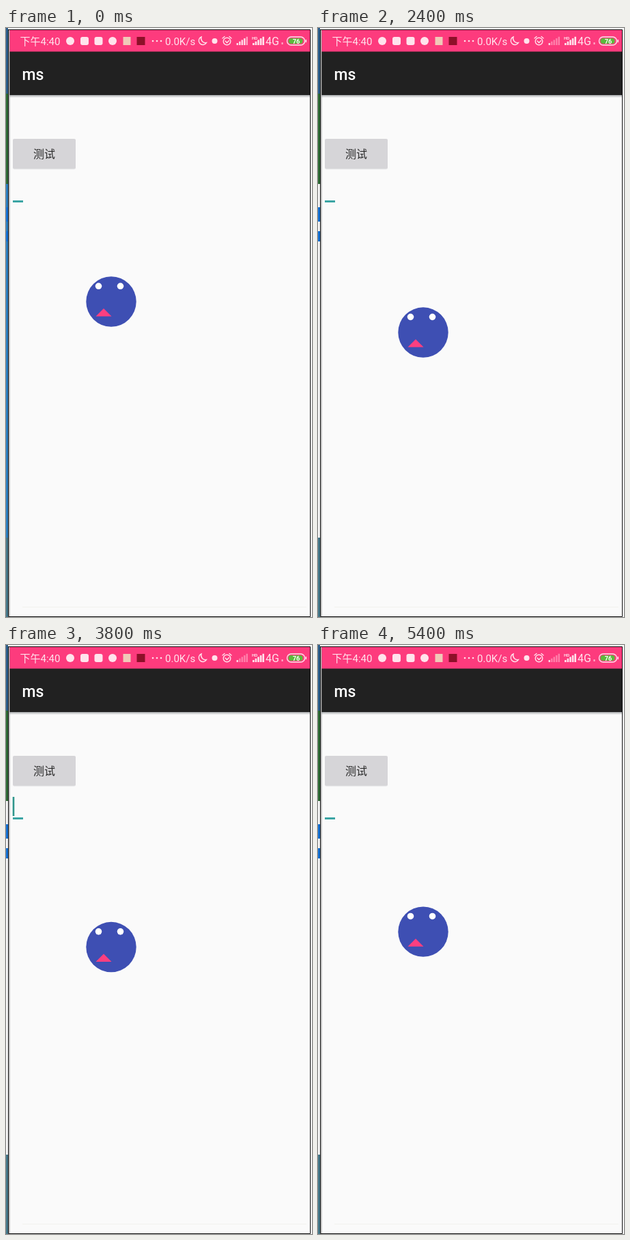
These frames come from a looping animation (448 by 861 pixels, 5500 ms). An HTML page:

```html
<!DOCTYPE html>
<html lang="zh">
<head>
<meta charset="utf-8">
<title>ms</title>
<style>
  html, body { margin: 0; width: 100%; height: 100%; overflow: hidden; background: #fafafa; }
  svg { display: block; width: 448px; height: 861px; }
  text { font-family: Roboto, "Noto Sans CJK SC", "Noto Sans CJK", sans-serif; }
  .status { fill: #ffe3ec; font-size: 15px; }
  .line { fill: none; stroke: #ffe3ec; stroke-width: 1.4; stroke-linecap: round; }
</style>
</head>
<body>
<svg viewBox="0 0 448 861">
  <defs>
    <linearGradient id="shade" x2="0" y2="1">
      <stop stop-color="#a9acae"/>
      <stop offset="1" stop-color="#fafafa"/>
    </linearGradient>
  </defs>
  <rect width="448" height="861" fill="#fafafa"/>

  <!-- desktop behind the window -->
  <rect width="3" height="96" fill="#2c5f8c"/>
  <rect y="96" width="3" height="132" fill="#2f6b35"/>
  <rect id="desk" y="228" width="3" height="517"/>
  <rect y="262" width="3" height="21" fill="#1672d4"/>
  <rect y="297" width="3" height="15" fill="#1672d4"/>
  <rect y="745" width="3" height="116" fill="#47798a"/>

  <!-- app bars -->
  <rect x="5" y="3" width="440" height="32" fill="#fd3b7d"/>
  <rect x="5" y="34.500" width="440" height="63.500" fill="#212121"/>
  <rect x="5" y="98" width="440" height="4" fill="url(#shade)"/>
  <text x="23.500" y="76" font-size="23" font-weight="500" fill="#fff">ms</text>

  <!-- status bar -->
  <g class="status">
    <text x="20.500" y="25">下午4:40</text>
    <circle cx="94" cy="19" r="6"/>
    <rect x="109" y="13" width="12" height="12" rx="3"/>
    <rect x="129.500" y="13" width="12" height="12" rx="3"/>
    <circle cx="156" cy="19" r="6"/>
    <rect x="171.500" y="13" width="11" height="12" fill="#f0c9b8"/>
    <rect x="191.500" y="13" width="12" height="12" fill="#8d1029"/>
    <circle cx="215" cy="19" r="1.300"/>
    <circle cx="221" cy="19" r="1.300"/>
    <circle cx="227" cy="19" r="1.300"/>
    <text x="233" y="25">0.0K/s</text>
    <path class="line" d="M286 13a6 6 0 1 0 7.500 8.500a6.500 6.500 0 0 1-7.500-8.500z"/>
    <circle cx="305.500" cy="19" r="4"/>
    <g class="line">
      <circle cx="323.500" cy="19.500" r="5.300"/>
      <path d="M321 19l2.500 2.500l3-3M317 15l3-2.500M330 15l-3-2.500"/>
    </g>
    <g id="signal"></g>
    <text x="360" y="17" font-size="6" font-weight="700">HD</text>
    <g id="signal2"></g>
    <text x="380" y="25" font-size="16">4G</text>
    <rect x="403.500" y="21" width="2" height="3" opacity=".7"/>
    <rect x="411.500" y="13" width="26" height="12" rx="6" fill="#fd3b7d" stroke="#ffe3ec" stroke-width="1.400"/>
    <rect x="413.500" y="15" width="21" height="8" rx="4" fill="#5cb93c"/>
    <text x="425" y="22.500" font-size="9" font-weight="700" text-anchor="middle" fill="#fff">76</text>
    <rect x="438.500" y="17" width="1.500" height="4"/>
  </g>

  <!-- button and input -->
  <rect x="10" y="163" width="92" height="43.500" rx="2" fill="#e2e2e4"/>
  <rect id="button" x="10" y="162" width="92" height="43.500" rx="2"/>
  <text x="56" y="190" font-size="16" font-weight="500" text-anchor="middle" fill="#2b2b2b">测试</text>
  <rect x="10" y="252" width="15" height="3" fill="#3ba5a4"/>
  <rect id="cursor" x="9.700" y="222" width="2.600" height="28" fill="#2f968c"/>

  <g id="ball">
    <circle cx="154" cy="400" r="36.700" fill="#3e4fb3"/>
    <circle cx="135.500" cy="377.300" r="4.800" fill="#fff"/>
    <circle cx="167.500" cy="377.300" r="4.800" fill="#fff"/>
    <path d="M143 410l11.500 11.500h-23z" fill="#fd3f80"/>
  </g>

  <path d="M24 846.500H440" stroke="#f2f2ed"/>
  <path d="M3 2.500H445.500V860.500H3.500V2.500" fill="none" stroke="#111"/>
  <path d="M5 3V860" stroke="#8d8d8d"/>
</svg>
<script>
  const LOOP = 5500, STEP = 100, DROP = 46, PRESS = 820;
  const $ = id => document.getElementById(id);

  // moments when the ball is lowest
  const lows = [996, 1715, 2433, 3129, 3875, 4500, 5205, 5910];
  const blinks = [[100, 600], [1200, 1800], [2600, 3300], [3700, 4300], [4700, 5300]];

  function bars(group, x, width) {
    for (let i = 0; i < 5; i++) {
      const h = 3 + i * 2.3;
      group.innerHTML += `<rect x="${x + i * width / 5}" y="${25 - h}" width="${width / 5 - 1}" height="${h}"/>`;
    }
  }
  bars($('signal'), 337.5, 17.5);
  bars($('signal2'), 361, 18);

  // whole numbers at the lows, halves at the top
  function cycle(t) {
    if (t < PRESS) return -.5;
    if (t < lows[0]) return (t - lows[0]) / (lows[0] - PRESS) / 2;
    const i = lows.findIndex(low => t < low);
    return (t - lows[i - 1]) / (lows[i] - lows[i - 1]);
  }

  function draw() {
    const t = Math.floor(performance.now() % LOOP / STEP) * STEP;
    const y = DROP * (1 + Math.cos(2 * Math.PI * cycle(t))) / 2;
    $('ball').setAttribute('transform', `translate(0 ${y.toFixed(2)})`);
    $('cursor').style.opacity = blinks.some(([on, off]) => t >= on && t < off) ? 1 : 0;
    $('button').style.fill = t >= 900 && t < 1500 ? '#c5c3c6' : '#d6d5d8';
    $('desk').style.fill = t < 900 ? '#2b7fc0' : '#f4f4f4';
    [...$('signal').children].forEach((bar, i) => {
      bar.style.opacity = t < 1500 ? (i < 4 ? .95 : .6) : (i < 1 ? .9 : .4);
    });
    requestAnimationFrame(draw);
  }
  draw();
</script>
</body>
</html>
```
